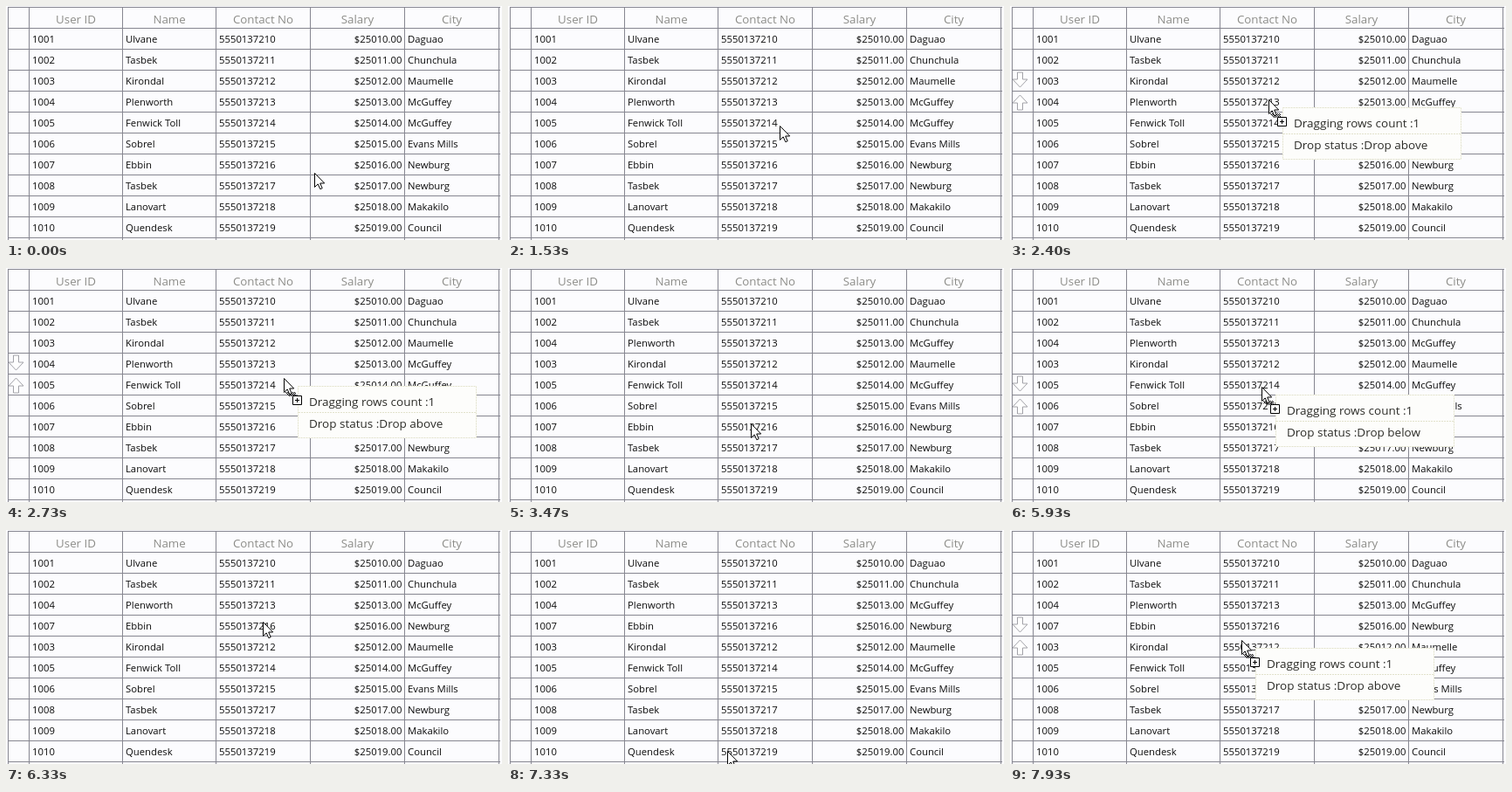
An HTML page for the animation above (8000 ms loop, 568 by 268 pixels).

```html
<!DOCTYPE html>
<html lang="en">
<head>
<meta charset="utf-8">
<title>Row drag and drop</title>
<style>
  html, body { margin: 0; width: 100%; height: 100%; overflow: hidden; background: #fcfcfe; }
  svg { display: block; font: 11.3px "Open Sans", "Noto Sans", sans-serif; fill: #0c0c0c; }
  .head { font-size: 13.3px; fill: #8c8c88; text-anchor: middle; }
  .num { text-anchor: end; }
  .tip { font-size: 13.5px; fill: #2c2c28; }
  .line { fill: none; stroke: #868690; }
  .arrow { fill: #fefefe; stroke: #a2a2a8; }
  .dots { fill: none; stroke: #e2e2cc; stroke-dasharray: 2 1; }
</style>
</head>
<body>
<svg width="568" height="268" viewBox="0 0 568 268">
  <path id="grid" class="line"/>
  <g id="heads"></g>
  <g id="rows"></g>
  <g id="marks" class="arrow">
    <path id="down" d="M-3-8.5h6v8h5.5l-8.5 9l-8.5-9h5.5z" transform="translate(11.5 -12.5)"/>
    <use href="#down" transform="scale(1 -1) translate(0 -1)"/>
  </g>
  <g id="tip" class="tip">
    <rect width="205" height="60" fill="#fdfdfb"/>
    <path class="dots" d="M.5 .5h204v59h-204zM1 30.5h203"/>
    <text x="13" y="22.5">Dragging rows count :1</text>
    <text id="status" x="13" y="47.5"></text>
  </g>
  <g id="cursor">
    <g id="badge">
      <path d="M2 16.5h11M3 17.5h11M4 18.5h10M5 19.5h9M6 20.5h6" stroke="#000" stroke-dasharray="1 1"/>
      <path d="M10.5 20.5h10v10h-10zM13 25.5h5M15.5 23v5" fill="#fff" stroke="#000"/>
    </g>
    <path d="M.5 .5v16l3.7-3.6 2.6 5.8 2.4-1-2.5-5.7h5z" fill="#fff" stroke="#000"/>
  </g>
</svg>
<script>
const $ = id => document.getElementById(id);
const LOOP = 8000, STEP = 200 / 3, ROW = 24, TOP = 25;
const edges = [26, 133, 240, 348, 456, 564];
const heads = ["User ID", "Name", "Contact No", "Salary", "City"];
const names = ["Ulvane", "Tasbek", "Kirondal", "Plenworth", "Fenwick Toll",
  "Sobrel", "Ebbin", "Tasbek", "Lanovart", "Quendesk"];
const cities = ["Daguao", "Chunchula", "Maumelle", "McGuffey", "McGuffey",
  "Evans Mills", "Newburg", "Newburg", "Makakilo", "Council"];

// The pointer rests between moves: start, end, x, y
const home = [353, 191];
const moves = [
  [1130, 1930, 270, 84], [2000, 2800, 322, 130], [2867, 3000, 308, 129],
  [3200, 3467, 278, 178], [4000, 4800, 282, 141], [4800, 4933, 280, 180],
  [5467, 6267, 294, 105], [6333, 6933, 251, 253], [7334, 7933, 265, 126]
];
// Press and drop times
const drags = [[2040, 3195], [5500, 6325], [7340, LOOP]];

const text = (x, y, s, cls = "") => `<text class="${cls}" x="${x}" y="${y}">${s}</text>`;
const place = (el, x, y) => el.setAttribute("transform", `translate(${x} ${y})`);
const show = (el, on) => el.setAttribute("visibility", on ? "visible" : "hidden");

function pointer(t) {
  let [x, y] = home;
  for (const [start, end, toX, toY] of moves) {
    const k = Math.min(1, Math.max(0, (t - start) / (end - start)));
    x += (toX - x) * k;
    y += (toY - y) * k;
  }
  return [Math.round(x), Math.round(y)];
}

function target(t) {
  const pos = (pointer(t)[1] - TOP) / ROW, row = Math.floor(pos);
  const below = pos - row >= .5;
  return { row, below, slot: row + below };
}

function orderAt(t) {
  const order = names.map((_, i) => i);
  for (const [press, drop] of drags) {
    if (t < drop) break;
    const from = target(press).row, { slot } = target(drop);
    const [id] = order.splice(from, 1);
    order.splice(slot > from ? slot - 1 : slot, 0, id);
  }
  return order;
}

let lines = "M2 1.5H566";
for (let i = 0; i < 11; i++) lines += `M2 ${TOP + i * ROW + .5}H566`;
for (const x of [2, ...edges]) lines += `M${x + .5} 1V268`;
$("grid").setAttribute("d", lines);
$("heads").innerHTML = heads.map((s, i) =>
  text((edges[i] + edges[i + 1] + 1) / 2, 20, s, "head")).join("");

$("rows").innerHTML = names.map((name, i) => {
  const cells = [1001 + i, name, 5550137210 + i, `$${25010 + i}.00`, cities[i]];
  return "<g>" + cells.map((s, c) => heads[c] === "Salary"
    ? text(edges[c + 1] - 2.5, 17, s, "num")
    : text(edges[c] + 4, 17, s)).join("") + "</g>";
}).join("");
const rows = [...$("rows").children];

function draw(t) {
  const [x, y] = pointer(t), { below, slot } = target(t);
  const dragging = drags.some(([press, drop]) => t >= press && t < drop);
  orderAt(t).forEach((id, i) => place(rows[id], 0, TOP + i * ROW));
  $("status").textContent = "Drop status :Drop " + (below ? "below" : "above");
  place($("cursor"), x, y);
  place($("tip"), x + 16, y + 9);
  place($("marks"), 0, TOP + slot * ROW);
  for (const id of ["tip", "marks", "badge"]) show($(id), dragging);
}

function frame() {
  const t = performance.now() % LOOP;
  draw(Math.floor((t + 5) / STEP) * STEP % LOOP);
  requestAnimationFrame(frame);
}
frame();
</script>
</body>
</html>
```
